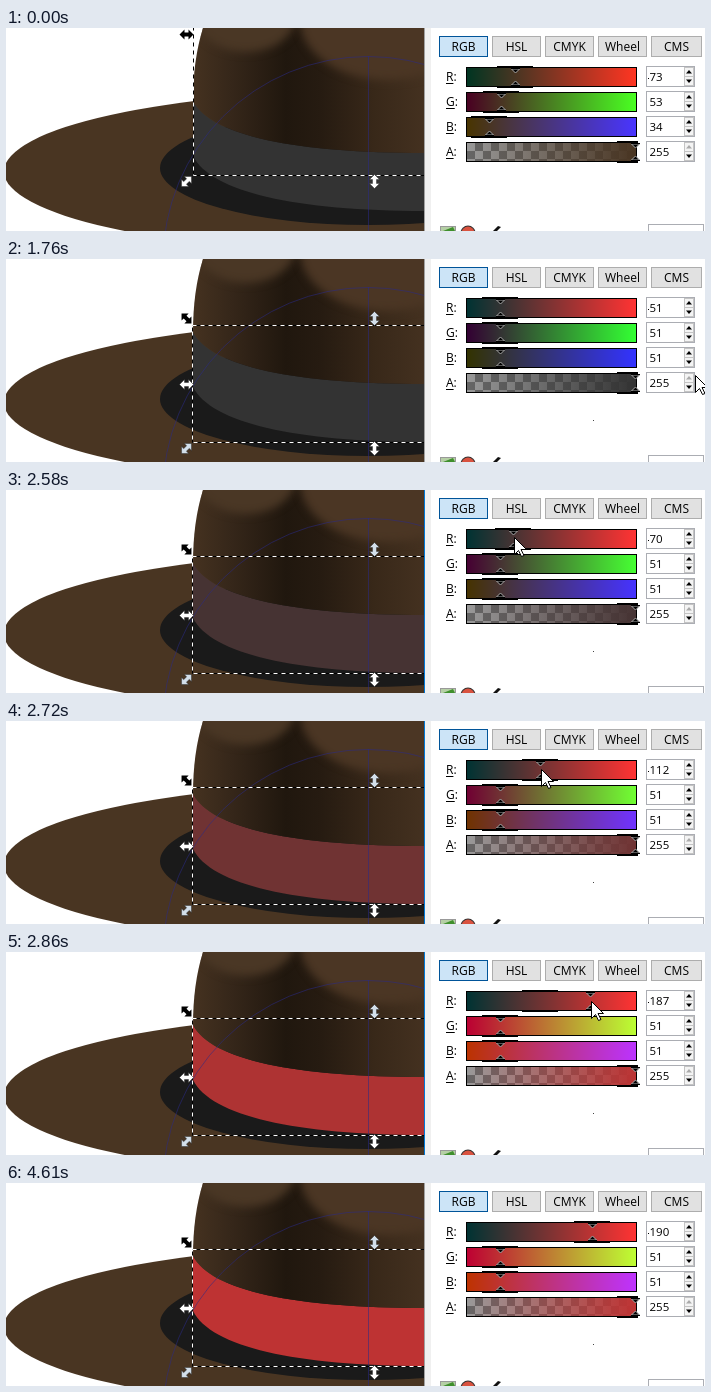
An HTML page with a canvas that plays this animation: 699x203 px, repeating every 4.76 s.

```html
<!DOCTYPE html>
<html lang="en">
<head>
<meta charset="utf-8">
<title>Recolouring a hat band</title>
<style>
html, body { margin: 0; width: 100%; height: 100%; overflow: hidden; background: #fff; }
canvas { display: block; }
</style>
</head>
<body>
<canvas id="stage" width="699" height="203"></canvas>
<script>
const ctx = document.getElementById('stage').getContext('2d');
const LOOP = 4760, SELECT = 1070, APPROACH = 1760, DRAG = 2360, SETTLE = 2940;
const LEAVE = 3320, EXIT = 3920, GONE = 4000, RELEASE = 4610;
const FONT = '"Open Sans", "Noto Sans", sans-serif';

const rgb = (r, g, b, a = 1) => `rgba(${r},${g},${b},${a})`;
const valueX = v => 461 + Math.floor(v * 168 / 255);

function stepped(t, from, length) {
  const k = Math.floor((t - from) / length * 7 + 0.25);
  return Math.max(0, Math.min(7, k)) / 7;
}

function redAt(t) {
  if (t < DRAG) return 51;
  if (t >= SETTLE) return 190;
  return Math.round(54 + 133 * stepped(t, DRAG, 500) ** 2.465);
}

function pointerAt(t) {
  if (t < APPROACH || t >= GONE) return null;
  if (t < DRAG) {
    const rest = (1 - stepped(t, APPROACH, 520)) ** 1.9;
    return [494 + 195 * rest, 46 + 70 * rest];
  }
  if (t < LEAVE) return [valueX(redAt(t)) + 1, 45 + 4 * stepped(t, DRAG, 500)];
  if (t < EXIT) {
    const p = stepped(t, LEAVE, 520);
    return [510 + 74 * (1 - p) ** 3, 50 + 105 * p ** 2.87];
  }
  return [533, 185];
}

function rect(x, y, w, h, color) {
  ctx.fillStyle = color;
  ctx.fillRect(x, y, w, h);
}

function frame(x, y, w, h, fill, edge) {
  rect(x, y, w, h, edge);
  rect(x + 1, y + 1, w - 2, h - 2, fill);
}

function poly(points, fill, edge) {
  ctx.beginPath();
  points.forEach(([x, y]) => ctx.lineTo(x, y));
  ctx.closePath();
  ctx.fillStyle = fill;
  ctx.fill();
  if (edge) {
    ctx.strokeStyle = edge;
    ctx.lineWidth = 1;
    ctx.stroke();
  }
}

function oval(x, y, rx, ry, color) {
  ctx.beginPath();
  ctx.ellipse(x, y, rx, ry, 0, 0, 2 * Math.PI);
  ctx.fillStyle = color;
  ctx.fill();
}

function text(s, x, y, size = 12, align = 'left') {
  ctx.font = `${size}px ${FONT}`;
  ctx.textAlign = align;
  ctx.fillStyle = '#000';
  ctx.fillText(s, x, y);
}

const band = new Path2D('M187 73C205 108 290 125 419 125V183C290 183 205 164 187 128Z');
const crown = new Path2D('M197 0C190 22 187 47 187 73C205 108 290 125 419 125V0Z');

function drawHat(bandColor) {
  oval(362, 143.5, 364, 80, '#493522');
  oval(362, 140, 208, 57, '#1a1a1a');
  ctx.fillStyle = bandColor;
  ctx.fill(band);

  ctx.save();
  ctx.clip(crown);
  const g = ctx.createLinearGradient(187, 0, 419, 0);
  g.addColorStop(0, '#453220');
  g.addColorStop(0.16, '#36271a');
  g.addColorStop(0.4, '#20170e');
  g.addColorStop(0.55, '#261b11');
  g.addColorStop(0.78, '#382819');
  g.addColorStop(1, '#443120');
  rect(187, 0, 232, 130, g);
  ctx.filter = 'blur(4px)';
  oval(240, -12, 50, 36, '#4a3725');
  oval(382, -8, 88, 60, '#4b3624');
  ctx.restore();

  // Construction guides
  ctx.strokeStyle = 'rgba(42,42,136,.55)';
  ctx.lineWidth = 1;
  ctx.beginPath();
  ctx.arc(362, 233.5, 205, Math.PI, 2 * Math.PI);
  ctx.moveTo(362.5, 28);
  ctx.lineTo(362.5, 203);
  ctx.stroke();
}

function marquee(x, top, bottom) {
  ctx.lineWidth = 1;
  for (const [color, dash] of [['#000', []], ['#fff', [4, 4]]]) {
    ctx.beginPath();
    ctx.rect(x + 0.5, top + 0.5, 300, bottom - top);
    ctx.setLineDash(dash);
    ctx.strokeStyle = color;
    ctx.stroke();
  }
  ctx.setLineDash([]);
}

// Two-headed arrow; turn is counted in eighths of a circle
function handle(x, y, turn, color) {
  ctx.save();
  ctx.translate(x + 0.5, y + 0.5);
  ctx.rotate(turn * Math.PI / 4);
  const half = [[-7, 0], [-2, -5], [-2, -2], [2, -2], [2, -5]];
  poly([...half, ...half.map(([a, b]) => [-a, -b])], color,
    color === '#000' ? null : 'rgba(40,40,40,.45)');
  ctx.restore();
}

function drawSelection(onBand) {
  const pale = '#d3dfea';
  ctx.save();
  ctx.beginPath();
  ctx.rect(0, 0, 419, 203);
  ctx.clip();
  if (onBand) {
    marquee(186, 66, 183);
    handle(180, 59, 1, '#000');
    handle(368, 59, 2, pale);
    handle(180, 125, 0, '#fff');
    handle(180, 189, 3, pale);
    handle(368, 189, 2, '#fff');
  } else {
    marquee(187, -8, 147);
    handle(180, 6, 0, '#000');
    handle(180, 153, 3, '#fff');
    handle(368, 153, 2, '#fff');
  }
  ctx.restore();
}

function checker(x, y, w, h, size) {
  for (let i = 0; i * size < w; i++) {
    for (let j = 0; j * size < h; j++) {
      rect(x + i * size, y + j * size, Math.min(size, w - i * size),
        Math.min(size, h - j * size), (i + j) % 2 ? '#666' : '#999');
    }
  }
}

function slider(label, y, value, mark, from, to) {
  text(label + ':', 440, y + 14);
  rect(440, y + 16, ctx.measureText(label).width, 1, '#000');

  rect(460, y, 171, 20, '#000');
  if (label === 'A') checker(461, y + 1, 169, 18, 8);
  const g = ctx.createLinearGradient(461, 0, 630, 0);
  g.addColorStop(0, from);
  g.addColorStop(1, to);
  rect(461, y + 1, 169, 18, g);

  // Bracket around the thumb
  const left = valueX(mark) - 18;
  const width = Math.min(36, 632 - left);
  rect(left, y - 1, width, 2, '#000');
  rect(left, y + 19, width, 2, '#000');

  const x = valueX(value) + 0.5;
  for (const [base, dir] of [[y + 1, 1], [y + 19, -1]]) {
    poly([[x - 4, base + dir], [x + 4, base + dir], [x, base + 5 * dir]], '#000', '#aaa');
    rect(x - 4.5, base, 9, dir, '#000');
  }

  frame(640, y - 1, 49, 21, '#fff', '#abadb3');
  text(value, 643.5, y + 14, 11.5);
  if (label === 'R') rect(642, y + 11, 1, 1, '#000');
  frame(678, y, 10, 10, '#f4f4f4', '#c4c4c4');
  frame(678, y + 9, 10, 10, '#f4f4f4', '#c4c4c4');
  poly([[680, y + 6.5], [686, y + 6.5], [683, y + 3]], value === 255 ? '#aaa' : '#000');
  poly([[680, y + 12.5], [686, y + 12.5], [683, y + 16]], '#000');
}

function drawPanel(r, g, b, mark) {
  rect(419, 0, 6, 203, '#f0f0f0');
  rect(425, 0, 274, 203, '#fff');
  ['RGB', 'HSL', 'CMYK', 'Wheel', 'CMS'].forEach((name, i, all) => {
    const x = 433 + i * 53;
    const w = i === all.length - 1 ? 51 : 49;
    frame(x, 8, w, 21, i ? '#e1e1e1' : '#cce4f7', i ? '#adadad' : '#005499');
    text(name, x + w / 2, 23, 12, 'center');
  });
  slider('R', 39, r, mark, rgb(0, g, b), rgb(255, g, b));
  slider('G', 64, g, g, rgb(r, 0, b), rgb(r, 255, b));
  slider('B', 89, b, b, rgb(r, g, 0), rgb(r, g, 255));
  slider('A', 114, 255, 255, rgb(r, g, b, 0), rgb(r, g, b));

  // Tops of the controls cut off by the lower edge
  frame(434, 198, 16, 9, '#b5cfa5', '#999');
  poly([[437, 203], [447, 199], [449, 203]], '#3f8f2c');
  oval(462, 205, 7.5, 7.5, '#333');
  oval(462, 205, 6.5, 6.5, '#d9523f');
  poly([[487, 203], [492, 198], [495, 199], [491, 203]], '#111');
  frame(642, 196, 56, 12, '#fff', '#abadb3');
}

function drawPointer(x, y) {
  const shape = [[0, 0], [0, 17], [4, 13], [7, 19], [9.5, 18], [6.5, 12], [12, 12]];
  poly(shape.map(([a, b]) => [x + a + 0.5, y + b + 0.5]), '#fff', '#000');
}

function draw(t) {
  const onBand = t >= SELECT;
  const red = redAt(t);
  // Bracket and band trail behind the value until the drag settles
  const mark = t < SETTLE ? Math.min(red, 112) : red;
  const bandRed = Math.round(red - 0.17 * (red - mark));

  rect(0, 0, 699, 203, '#fff');
  drawHat(rgb(bandRed, 51, 51));
  drawSelection(onBand);
  if (onBand) {
    drawPanel(red, 51, 51, mark);
    rect(587, 161, 1, 1, '#444');
  } else {
    drawPanel(73, 53, 34, 73);
  }
  rect(418, 0, 1, 203, t >= DRAG && t < RELEASE ? '#0078d7' : '#a0a0a0');
  const tip = pointerAt(t);
  if (tip) drawPointer(...tip.map(Math.round));
}

const start = performance.now();
function tick() {
  draw((performance.now() - start) % LOOP);
  requestAnimationFrame(tick);
}
tick();
</script>
</body>
</html>
```
